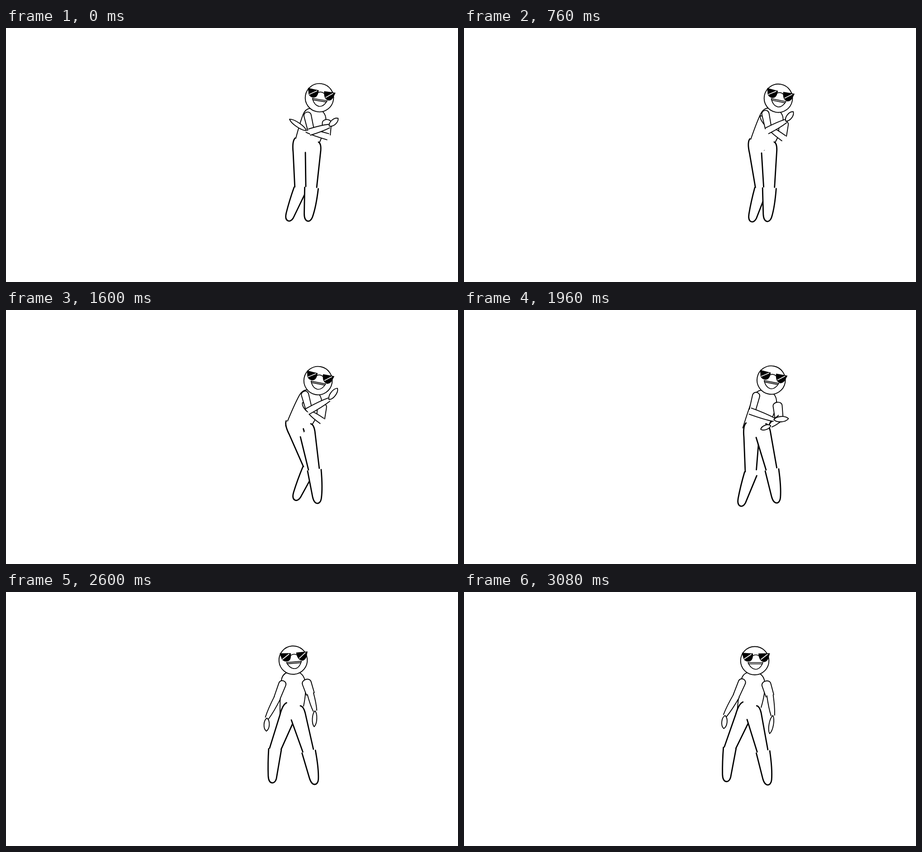
An HTML page with a canvas for the animation above (3.12 s loop, 998x561 px).

```html
<!DOCTYPE html>
<html lang="en">
<head>
<meta charset="utf-8">
<title>Dancing figure</title>
<style>
html, body { margin: 0; width: 100%; height: 100%; overflow: hidden; background: #fff; }
canvas { display: block; }
</style>
</head>
<body>
<canvas id="stage" width="998" height="561"></canvas>
<script>
const ctx = document.getElementById('stage').getContext('2d');
const LOOP = 3120, STEP = 40;

// Key poses: joint angles in degrees; all other joints follow from these
const poses = [
  { at: 0, headX: 692, lean: 14, hipX: 661, thighL: -20, shinL: 16, thighR: 0,
    upperL: 77, foreL: -17, reachL: .9, foreR: 196, reachR: 1.05 },
  { at: 440, headX: 696, lean: 17, hipX: 660, thighL: -20, shinL: 10, thighR: 1.5,
    upperL: 79, foreL: -28, reachL: .87, foreR: 218, reachR: .85 },
  { at: 1080, headX: 692, lean: 20, hipX: 654, thighL: -34, shinL: 13, thighR: -7,
    upperL: 78, foreL: -27, reachL: .97, foreR: 213, reachR: .75 },
  { at: 1600, headX: 689, lean: 22, hipX: 650, thighL: -41, shinL: 19, thighR: -13,
    upperL: 75, foreL: -29, reachL: 1.08, foreR: 215, reachR: .65 },
  { at: 2320, headX: 667.5, lean: 12, hipX: 640, thighL: 2, shinL: 6.5, thighR: -19.5,
    upperL: 134, foreL: 69, reachL: 1.15, foreR: 68, reachR: .45 },
  { at: 2600, headX: 634, lean: 0, hipX: 630, thighL: 0, shinL: 0, thighR: -19,
    upperL: 111, foreL: 117, reachL: 1, foreR: 75, reachR: .82 },
  { at: 3080, headX: 642, lean: 5, hipX: 625, thighL: 2, shinL: 1, thighR: -16.5,
    upperL: 113, foreL: 120, reachL: 1, foreR: 82, reachR: .95 }
];

// Each body part: white body, then its drawn edges
const shape = (body, edge = body) => ({ body: new Path2D(body), edge: new Path2D(edge) });
const torso = shape('M-14 0 Q-24 4 -26 17 Q-29 42 -29 92 L23 74 Q30 40 26 18 Q24 6 14 0',
  'M-14 0 Q-24 4 -26 17 Q-29 42 -29 92 M14 0 Q24 6 26 18 Q30 40 23 74');
const thighL = shape('M38 -102 Q29 -98 23 -74 L0 0 L25 3 L55 -64 Z',
  'M38 -102 Q29 -98 23 -74 L0 0 M25 3 L55 -64');
const thighR = shape('M29 -23 Q35 -20 34 -5 L25 77 L25 81 L1 81 L0 0 Z',
  'M29 -23 Q35 -20 34 -5 L25 77 M0 0 L1 75');
const shinL = shape('M0 0 Q-2 32 -1 60 C0 80 14 79 17 66 Q20 48 28 2');
const shinR = shape('M0 0 L-1 58 C-1 78 12 79 17 66 Q25 44 30 3');
const mouth = shape('M-15 4 L18 4 Q12 19 2 19 Q-9 18 -15 4 Z',
  'M-15 4 L18 4 Q12 19 2 19 Q-9 18 -15 4 Z M-13 7 L16 7');
const face = shape('M-31.3 0 A31.3 31.3 0 1 1 31.3 0 A31.3 31.3 0 1 1 -31.3 0 Z');
const lenses = new Path2D('M-28.5 -17.5 L-4 -16 Q-3 2 -15 2 Q-25 1 -26 -9 Z ' +
  'M8 -16 L33.5 -16.5 L31 -8 Q28 3 20 3 Q9 1 8 -16 Z');
const bridge = new Path2D('M-4 -11 Q2 -15 9 -11');
const glints = new Path2D('M-8 -14 L-23 -4 M28 -14 L14 -3');

const rad = deg => deg * Math.PI / 180;

function move([x, y], dx, dy, deg) {
  const c = Math.cos(rad(deg)), s = Math.sin(rad(deg));
  return [x + dx * c - dy * s, y + dx * s + dy * c];
}

function poseAt(t) {
  let i = 0;
  while (i < poses.length - 2 && t >= poses[i + 1].at) i++;
  const a = poses[i], b = poses[i + 1], p = {};
  const u = (t - a.at) / (b.at - a.at);
  for (const k in a) p[k] = a[k] + (b[k] - a[k]) * u;
  return p;
}

function place([x, y], deg, draw) {
  ctx.save();
  ctx.translate(x, y);
  ctx.rotate(rad(deg));
  draw();
  ctx.restore();
}

function ink({ body, edge }, width) {
  ctx.fillStyle = '#fff';
  ctx.strokeStyle = '#000';
  ctx.lineWidth = width;
  ctx.fill(body);
  ctx.stroke(edge);
}

const part = (s, joint, deg, width) => place(joint, deg, () => ink(s, width));

function drawLegs(p) {
  const hip = [p.hipX, 275 - .4 * p.thighR];
  // The left hip rises as that thigh swings across
  const hipL = [hip[0] + 6.5, hip[1] + 2.6e-4 * p.thighL ** 3];
  const knee = move(hipL, -55, 64, p.thighL);
  part(thighL, knee, p.thighL, 2.8);
  part(shinL, [knee[0] - 1.5, knee[1] - .5], p.shinL, 2.8);
  part(thighR, hip, p.thighR, 2.8);
  part(shinR, move(hip, -1.5, 77, p.thighR), .92 * p.thighR, 2.8);
}

function drawHead(joint, tilt) {
  place(joint, tilt, () => {
    ink(face, 1.9);
    ink(mouth, 1.7);
    ctx.stroke(bridge);
    ctx.fillStyle = '#000';
    ctx.fill(lenses);
    ctx.strokeStyle = '#fff';
    ctx.stroke(glints);
  });
}

// size: lengths of the three bones, then half widths of shoulder, cuff and palm
function drawArm(shoulder, [upper, fore, hand], [a, b, c, top, cuff, palm]) {
  const elbow = move(shoulder, a, 0, upper), wrist = move(elbow, b, 0, fore);
  const end = a * .9, low = top - 1;
  part(shape(`M${end} ${-low} L4 ${-top} C-8 ${-top - 1} -8 ${top + 1} 4 ${top} L${end} ${low}`),
    shoulder, upper, 1.9);
  const out = `M-4 ${-cuff} Q${b * .6} ${-cuff} ${b} -4`, back = `${b} 4 Q${b * .6} ${cuff} -4 ${cuff}`;
  part(shape(`${out} L${back}`, `${out} M${back}`), elbow, fore, 1.9);
  part(shape(`M0 0 C${c * .2} ${-palm} ${c * .8} ${-palm} ${c} 0 C${c * .8} ${palm} ${c * .2} ${palm} 0 0 Z`),
    wrist, hand, 1.9);
}

function draw(t) {
  const p = poseAt(t);
  const head = [p.headX, 150.5 + .25 * p.lean];
  const neck = move(head, 0, 27.5, p.lean);
  const shoulderL = move(neck, -4 - .17 * p.upperL, 23 - .6 * p.lean, p.lean);
  const shoulderR = move(neck, 29, 20, p.lean);
  ctx.fillStyle = '#fff';
  ctx.fillRect(0, 0, 998, 561);
  part(torso, neck, p.lean, 1.9);
  drawLegs(p);
  drawHead(head, Math.min(11, p.lean - 5));
  drawArm(shoulderR, [58 + .18 * p.foreR, p.foreR, p.foreR + 18],
    [32, 43 * p.reachR, 43 * p.reachR, 10, 7, 6.5]);
  drawArm(shoulderL, [p.upperL, p.foreL, p.foreL - 24],
    [39, 46 * p.reachL, 29 * p.reachL, 8, 7.2, 7.8]);
}

function tick() {
  const t = performance.now() % LOOP;
  draw(Math.floor(t / STEP) * STEP);
  requestAnimationFrame(tick);
}

ctx.lineJoin = ctx.lineCap = 'round';
tick();
</script>
</body>
</html>
```
